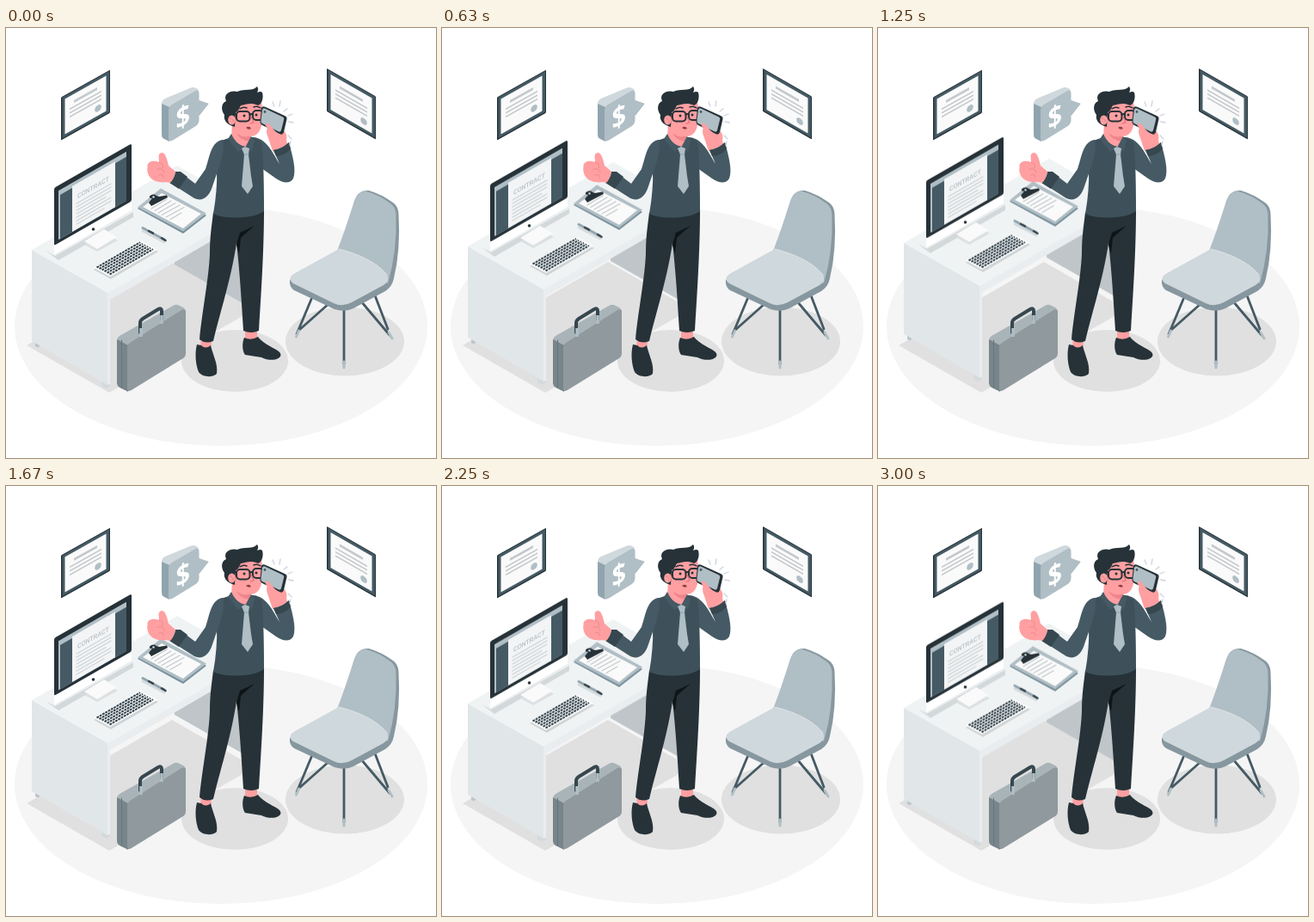
Animation of 500x500 px, one loop 3.04 s. Source, as an HTML page:

```html
<!DOCTYPE html>
<html lang="en">
<head>
<meta charset="utf-8">
<title>Business call</title>
<style>
html, body { margin: 0; width: 100%; height: 100%; overflow: hidden; background: #fff; }
svg { display: block; width: 100%; height: 100%; }
.desk { animation: float 3040ms linear infinite; }
@keyframes float {
  50% { transform: translateY(-10px); }
}
.line { fill: none; stroke-linecap: round; stroke-linejoin: round; }
.ink { fill: #263238; }
.slate { fill: #455a64; }
.dusk { fill: #37474f; }
.steel { fill: #90a4ae; }
.mist { fill: #b0bec5; }
.fog { fill: #cfd8dc; }
.skin { fill: #ff9fa1; }
.shade { fill: #e0e0e0; }
.title { font: bold 7.8px "Liberation Sans", Arial, sans-serif; fill: #bdc3c7; }
.sign { font: bold 34px "Open Sans", "Liberation Sans", sans-serif; fill: #fff; }
</style>
</head>
<body>
<svg viewBox="0 0 500 500">
  <defs>
    <g id="diploma">
      <rect width="57" height="50" rx="1" class="ink"/>
      <rect x="1.5" y="1" width="54.5" height="47.5" class="slate"/>
      <rect x="4.5" y="4.5" width="48" height="41" fill="#fafafa"/>
      <g class="line" stroke="#c3c8cb" style="stroke-linecap:butt">
        <path d="M15 13.5H42" stroke-width="3"/>
        <path d="M10 19.5H47M10 24H47M10 28.5H47" stroke-width="1.8"/>
      </g>
      <circle cx="43" cy="37" r="3.8" class="mist"/>
    </g>
  </defs>

  <!-- floor and shadows -->
  <ellipse cx="250" cy="347" rx="240" ry="139" fill="#f5f5f5"/>
  <path class="shade" d="M24 369L120 424L289 327L193 272Z"/>
  <ellipse class="shade" cx="266" cy="387" rx="62" ry="36"/>
  <ellipse class="shade" cx="394" cy="364.500" rx="69" ry="40"/>

  <!-- wall -->
  <use href="#diploma" transform="matrix(1 -.56 0 1 64 80.500)"/>
  <use href="#diploma" transform="matrix(1 .57 0 1 373 47)"/>
  <path class="fog" d="M181 88Q181 84 185 82L215 69.500Q218 68.500 220 69.500L224 71.500L190 96Z"/>
  <path class="steel" d="M181 88L190 92V132L183 128.500Q181 127.500 181 124Z"/>
  <path class="steel" d="M223 84L235.500 88L224.500 102Z"/>
  <path class="mist" d="M189 96Q189 91.500 193 89L219.500 73.500Q224.500 70.500 224.500 76V84L235.500 88L224.500 101V107Q224.500 112 220 114.500L194 130.500Q189 133.500 189 128Z"/>
  <text class="sign" transform="matrix(.85 -.42 0 1 197.500 119)">$</text>

  <g class="desk">
    <!-- table -->
    <path d="M196 262L240 236L280 225V324L275 320L196 275Z" fill="#bfc5c8"/>
    <path d="M34 362V370L37 371.500L40.500 369V362Z" fill="#b9c4c9"/>
    <path d="M111 408V416L117 419L121 416V406Z" fill="#d3dadd"/>
    <path d="M30 258L118 308V415L30 364Z" fill="#e1e6e8"/>
    <path d="M118 307L288 210V219L121 316V414L118 415Z" fill="#e9edef"/>
    <path d="M30 258L199 160L288 211L119 308Z" fill="#f0f3f4"/>

    <!-- monitor -->
    <path d="M46 259L57 265L148 214L148 220L61 270Z" fill="#d3d8da"/>
    <path d="M91 252L114 239L130 247L106 260Z" fill="#dce0e2"/>
    <path d="M91 248L114 234L129 243L106 257Z" fill="#fafafa"/>
    <g transform="matrix(1 -.573 0 1 56 186)">
      <rect y="62" width="90" height="17" rx="1" fill="#fff"/>
      <path d="M.5 78.500H90" class="line" stroke="#dfe4e6"/>
      <rect width="90" height="67" rx="2" class="ink"/>
      <rect x="5" y="6" width="79" height="57" class="mist"/>
      <rect x="7" y="12" width="77" height="51" fill="#455a64"/>
      <rect x="21" y="10" width="50" height="53" fill="#f2f4f5"/>
      <text class="title" x="27" y="28" textLength="0" transform="scale(1)" style="display:none"></text>
      <text class="title" transform="matrix(.84 0 0 1 27 28)">CONTRACT</text>
      <path class="line" stroke="#ccd1d4" stroke-width="1.200" d="M26 33H66M26 37H66M26 41H66M26 45H60M26 49H66M26 53H66M26 57H58"/>
    </g>
    <circle class="ink" cx="101.500" cy="234" r="1.800"/>

    <!-- keyboard -->
    <path d="M102 281L156 250L177 260L122 292Z" fill="#cfd4d6"/>
    <path d="M102 278.500L156 247L176 257.500L121 289Z" fill="#fff"/>
    <g class="line" stroke="#37474f" stroke-width="2.100" stroke-dasharray="2.900 .9" style="stroke-linecap:butt">
      <path d="M105.500 278.500L156 249.200M108.500 280L159 250.800M111.500 281.500L162 252.400M114.500 283.200L165 254M117.500 284.800L168 255.600M120.500 286.500L171 257.200"/>
    </g>

    <!-- pen -->
    <path class="line" stroke="#d5dadc" stroke-width="3" d="M159 236L184 249"/>
    <path class="line" stroke="#90a4ae" stroke-width="3" d="M159 232.500L184 246"/>
    <path class="line" stroke="#37474f" stroke-width="2.500" d="M166 236L171 238.700M181 244.300L185.500 247"/>

    <!-- clipboard -->
    <path d="M153 210L206 239L233 218L180 188Z" fill="#78909c"/>
    <path d="M153 208.500L206 236.500L233 215.500L180 186.500Z" class="mist"/>
    <path d="M159 208L206 233L227 216L181 192Z" fill="#fafafa"/>
    <path class="line" stroke="#c3c9cc" stroke-width="1.200" d="M169 210L187 199M173 212.500L192 201M177 215L197 203.500M181 217.500L202 206M186 220L207 208.500M191 222.500L204 215"/>
    <path class="ink" d="M166 203L170 198Q166 198 167 195.500Q171 192 175 195L178 196L187 194.500L188 197L169 207Z"/>
    <circle class="fog" cx="171.500" cy="196.500" r="1.300"/>
  </g>

  <!-- briefcase -->
  <path d="M129 363Q129 360 132 358L194 323Q197 321 200 322L208 326L143 371Z" fill="#a9b4b9"/>
  <path d="M129 362L142 369V423L132 418Q129 416 129 413Z" fill="#78858b"/>
  <path d="M141 371Q141 368 144 366L204 328Q209 325 209 330V378Q209 382 206 384L146 421Q141 424 141 419Z" fill="#8f999e"/>
  <path class="line" stroke="#66747b" d="M134.500 363V418"/>
  <path class="line" stroke="#37474f" stroke-width="4" d="M156 354V343Q156 340 159 338L177 327Q181 325 181 329V339"/>
  <path class="line" stroke="#b0bec5" stroke-width="3.500" style="stroke-linecap:butt" d="M157 349V359M181 334V344"/>

  <!-- chair -->
  <g class="line" stroke-width="2.800">
    <path stroke="#455a64" d="M356 313L338 356M376 320L340 352M393 324V391M413 318L446 357M429 311L444 350"/>
    <path stroke="#b0bec5" stroke-width="3" d="M340.500 352L337.500 359M393 388V395M445 354L449 361"/>
  </g>
  <path d="M408 195Q413 188 422 189Q436 193 450 203Q456 207 456.500 216Q459 258 451 291Q449 301 441 306L404 326Q394 331 382 327L335 305Q329 301 330 293L388 258Z" fill="#87979f"/>
  <path class="mist" d="M385 259Q393 239 404 204Q408 189 419 190Q434 194 447 204Q453 208 453.500 217Q455 260 444 297Z"/>
  <path class="fog" d="M387 257L336 285Q326 291 334 297L381 320Q391 325 402 319L439 299Q447 294 443 287Q428 268 387 257Z"/>
  <path class="line" stroke="#dfe5e8" d="M387 257Q427 267 443 287"/>

  <!-- feet -->
  <path class="skin" d="M227 355H240L238 374H226ZM278 346H292L292 364H278Z"/>
  <path class="ink" d="M222 368C219 379 221 393 224 400C229 407 242 406 245 402C247 391 240 379 238 369Q232 374 227 369Z"/>
  <path class="ink" d="M277 360C274 367 275 376 278 380L297 383C307 388 319 386 319.500 380C319 373 302 371 293 359Q285 364 277 360Z"/>

  <!-- trousers -->
  <path class="ink" d="M241 214C255 222 290 220 300 211C300 250 298 290 294 352Q285 356 276 352C274 320 272 285 268 250C262 290 252 320 241 364Q232 368 225 362C228 330 236 290 237 262C237 240 240 225 241 214Z"/>
  <path fill="#0e1518" d="M268 252L272 238L289 230Q277 240 273 244L271 262Z"/>

  <!-- far arm with phone -->
  <path class="skin" d="M310 143L305 128Q301 119 305 113L322 118Q328 124 326 130L328 139Z"/>
  <path class="slate" d="M289 127C304 130 310 145 318 158L311 142Q320 141 329 133C333 148 338 165 334 175C330 182 321 180 314 175L297 163Z"/>
  <path class="dusk" d="M311 142Q321 141 329 133L331 141Q323 149 314 149Z"/>

  <!-- torso -->
  <path fill="#3e515b" d="M247 132L262 127H288L297 132Q300 150 300 213C288 222 255 223 241 216Q246 188 245 165Z"/>
  <path class="slate" d="M252 130C238 132 237 150 232 164L220 181L203 168L194 182L219 198C228 202 235 197 239 187L248 161Q255 140 252 130Z"/>
  <path class="dusk" d="M203 167L211 173L201 187L190 180Q196 175 197 167Z"/>
  <path class="skin" d="M197 167L189 160C187 151 185 145 181 145C176 146 178 151 178 156C170 153 164 156 164.500 161C163 170 168 176 174 178C182 181 187 178 191 180Q195 176 197 167Z"/>
  <path class="line" stroke="#e98389" stroke-width=".8" d="M178 156Q184 158 182 163M176 164Q184 163 184 168M178 171Q184 169 183 174"/>

  <!-- neck, collar, tie -->
  <path class="skin" d="M263 110L262 127Q270 137 279 138Q285 134 285 123Z"/>
  <path fill="#ef858b" d="M268 122Q276 129 285 125L284 132Q272 131 268 122Z"/>
  <path class="slate" d="M262 123L258 129L270 144L278 139Q266 134 262 123ZM285 126L278 139L286 144L289 131Z"/>
  <path class="mist" d="M274 140L278 138L283 140L282 147L285 172L287 184L281 193L274 184L277 147Z"/>
  <path class="line" stroke="#90a4ae" d="M277 147H282"/>

  <!-- head -->
  <path class="skin" d="M264 88Q280 77 297 86C299 96 299 108 296 117Q293 126 283 126Q271 124 266 114Z"/>
  <path class="ink" d="M266 115C255 112 253 106 254 101C249 94 251 87 256 85C252 76 262 72 269 74C278 70 287 74 292 68C294 71 293 73 292 75Q296 73 298 75C300 82 297 89 293 90C285 86 279 89 273 90Q270 97 267 98Z"/>
  <ellipse class="skin" cx="262.500" cy="107" rx="4.300" ry="5.500"/>
  <path class="line" stroke="#e98389" stroke-width=".9" d="M260.500 105Q264 105 264 109"/>
  <g class="line" stroke="#263238" stroke-width="2">
    <rect x="268" y="97" width="15.500" height="11.500" rx="4"/>
    <rect x="287" y="96" width="12" height="11" rx="4"/>
    <path d="M258 99L268 100M283.500 101Q285 99 287 101"/>
    <path stroke-width="1.500" d="M272 94Q276 91 280 93M288 92Q292 90 296 93"/>
  </g>
  <circle class="ink" cx="277" cy="102" r="1.500"/>
  <circle class="ink" cx="291" cy="101" r="1.500"/>
  <path class="line" stroke="#e26f78" stroke-width="1.100" d="M285 103L288 110L284 111"/>
  <path fill="#8d3e48" d="M279 116Q283 113 285 117Q282 119 279 116Z"/>

  <!-- phone -->
  <path class="ink" d="M297 93Q298 90 302 92L324 102Q327 103 326.500 106L323 121Q322 125 318 123L298 113Q295 111 295.500 108Z"/>
  <path class="mist" d="M298 95Q299 92 302 94L321 103Q324 104 323 107L320 119Q319 122 316 120L298 111Q296 110 296.500 107Z"/>
  <circle class="slate" cx="301" cy="97.500" r="1.400"/>
  <path class="line" stroke="#ff9fa1" stroke-width="4.500" d="M304 113L309 119M308 118L314 124"/>
  <path class="line" stroke="#cdd2de" stroke-width="1.300" d="M310 86L312 91M319 85L318 91M327 94L323 97M333 100L328 102M334 110L329 109M328 125L332 129M331 132L330 136"/>
</svg>
</body>
</html>
```
